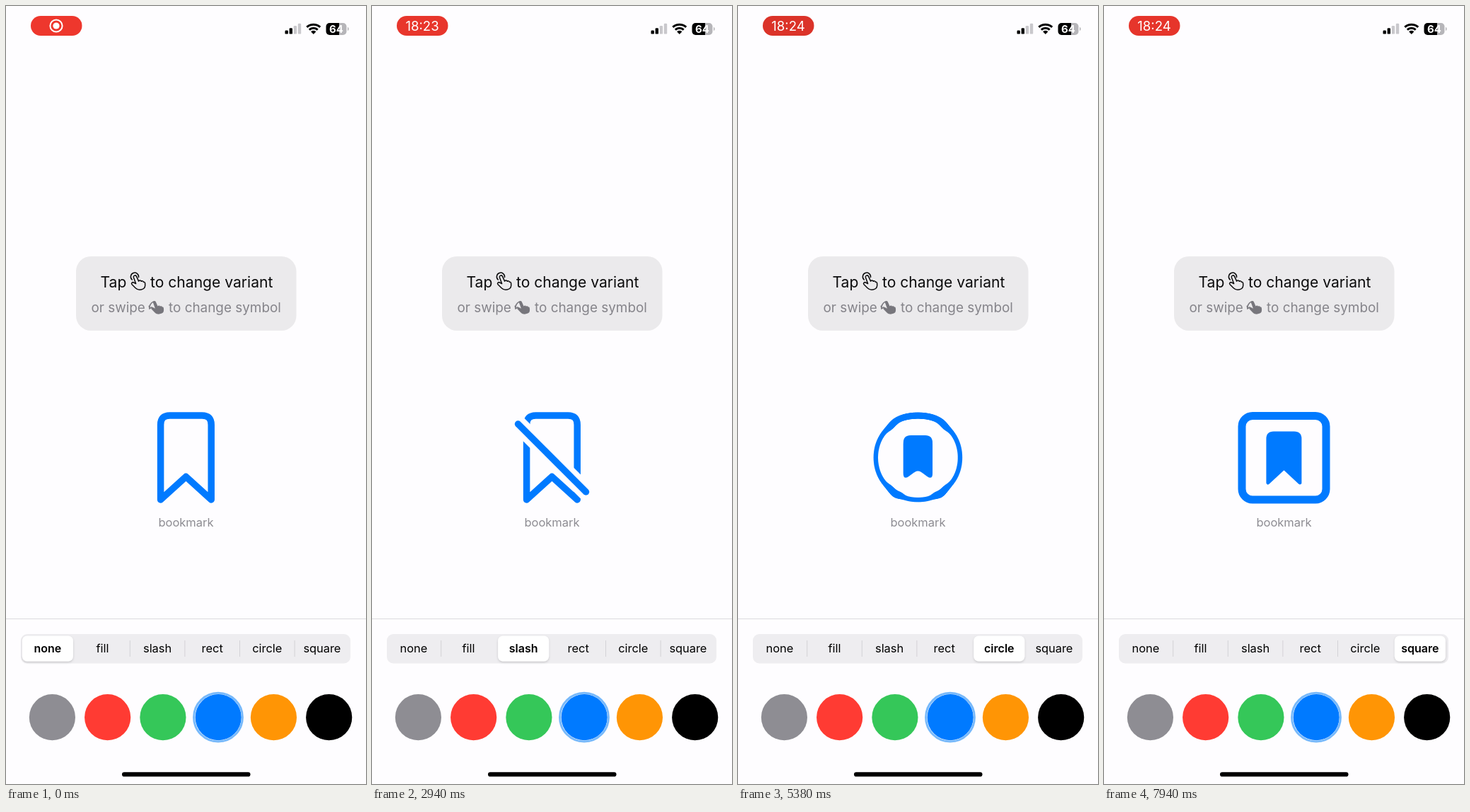
These frames come from a looping animation (509x1100 px, 8000 ms). An HTML page:

```html
<!DOCTYPE html>
<html lang="en">
<head>
<meta charset="utf-8">
<title>Symbol variants</title>
<style>
  html, body { margin: 0; width: 100%; height: 100%; overflow: hidden; background: #fefdff; }
  svg { display: block; width: 100%; height: 100%; font-family: Inter, "Liberation Sans", sans-serif; }
  .mid { text-anchor: middle; }
  .blue { fill: #007aff; stroke: #007aff; stroke-linejoin: round; stroke-linecap: round; }
  .line { fill: none; stroke-width: 9.5; }
  #symbol { isolation: isolate; }
  #symbol > g { mix-blend-mode: plus-lighter; }
</style>
</head>
<body>
<svg viewBox="0 0 509 1100" preserveAspectRatio="none">
  <defs>
    <filter id="goo" filterUnits="userSpaceOnUse" x="150" y="540" width="210" height="200" color-interpolation-filters="sRGB">
      <feGaussianBlur id="blur" stdDeviation="0"/>
      <feColorMatrix values="0 0 0 0 0  0 0 0 0 .478  0 0 0 0 1  0 0 0 14 -6.7"/>
    </filter>
    <filter id="shadow" x="-20%" y="-30%" width="140%" height="170%">
      <feDropShadow dx="0" dy="1.5" stdDeviation="1.8" flood-opacity=".17"/>
    </filter>
    <mask id="gap" maskUnits="userSpaceOnUse" x="150" y="540" width="210" height="200">
      <path d="M150 540h210v200h-210z" fill="#fff"/>
      <path d="M194 578.5L314 698.5" stroke="#000" stroke-width="24"/>
    </mask>
    <path id="hand" d="M180.3 383.5a2.2 2.2 0 0 1 4-1.6l3.3 7.2c1-1.5 3-1.3 3.6.2c1.2-1 2.8-.4 3.2.9c1.2-.3 2.2.4 2.2 2c.6 4 .2 7-3.5 8.2c-4 1.6-7.5.8-10-1.6l-5-5c-1.6-1.8.6-4 2.5-2.8l3 1.6z" stroke-linejoin="round"/>
  </defs>

  <rect width="509" height="1100" fill="#fefdff"/>

  <!-- status bar -->
  <rect id="badge" x="35" y="14" width="72.5" height="28" rx="14"/>
  <g id="record">
    <circle cx="71" cy="28" r="8.6" fill="none" stroke="#fff" stroke-width="2"/>
    <circle cx="71" cy="28" r="4.6" fill="#fff"/>
  </g>
  <text id="clock" class="mid" x="71" y="34.6" font-size="18.6" fill="#fff"></text>
  <g id="bars"></g>
  <g fill="none" stroke="#000" stroke-width="3">
    <path d="M425.3 29.8a14 14 0 0 1 18.9 0"/>
    <path d="M428.8 33.6a8.8 8.8 0 0 1 11.9 0"/>
    <path d="M434.75 40l-3.6-3.7a5.2 5.2 0 0 1 7.2 0z" fill="#000" stroke="none"/>
  </g>
  <path d="M471 24h5.5a5 5 0 0 1 5 5v7a5 5 0 0 1-5 5h-5.5z" fill="#b6b5b9"/>
  <path d="M471 24h-13.5a5 5 0 0 0-5 5v7a5 5 0 0 0 5 5h13.5z"/>
  <path d="M483 29.8a3 3 0 0 1 0 5.4z" fill="#b6b5b9"/>
  <text class="mid" x="467" y="37.9" font-size="15" font-weight="700" fill="#fff">64</text>

  <!-- hint card -->
  <rect x="99" y="354" width="311.5" height="105" rx="21" fill="#ebeaec"/>
  <g font-size="21.1" fill="#0b0b0c">
    <text x="133.5" y="398">Tap</text>
    <text x="204" y="398">to change variant</text>
  </g>
  <g fill="none" stroke="#0b0b0c" stroke-width="1.5">
    <use href="#hand"/>
    <path d="M178.3 387a5.6 5.6 0 1 1 9.2-3.5" stroke-linecap="round"/>
  </g>
  <g font-size="18.9" fill="#85848a">
    <text x="120.5" y="433">or swipe</text>
    <text x="230" y="433">to change symbol</text>
  </g>
  <use href="#hand" transform="translate(42 66.500) scale(.92)" fill="#77767c"/>
  <path d="M203 427.500q-.2-6.500 5.200-9.300M202.300 424.300l.7 3.600 3-2" fill="none" stroke="#77767c" stroke-width="1.500" stroke-linecap="round"/>

  <!-- morphing symbol -->
  <g id="symbol"></g>
  <text class="mid" x="254.500" y="736" font-size="16.500" fill="#8d8c92">bookmark</text>

  <!-- controls -->
  <path d="M0 866.500h509" stroke="#dcdbde"/>
  <rect x="21" y="888" width="466" height="41.500" rx="9" fill="#eeedf0"/>
  <g id="seps" stroke="#d3d2d6"></g>
  <rect id="pill" y="890.500" width="72" height="36" rx="7" fill="#fff" filter="url(#shadow)"/>
  <g id="labels" class="mid" fill="#000"></g>
  <g id="swatches"></g>
  <circle cx="300" cy="1005.700" r="34.400" fill="none" stroke="#78b9fa" stroke-width="3"/>
  <rect x="164" y="1083.300" width="181.500" height="6.200" rx="3.100"/>
</svg>
<script>
const $ = id => document.getElementById(id);
const LOOP = 8000, SLIDE = 350, MORPH = 700;
const clamp = x => Math.min(1, Math.max(0, x));
const smooth = x => x * x * (3 - 2 * x);
const easeOut = x => 1 - (1 - x) ** 3;
const segX = i => 58.9 + i * 77.6;

// Ribbon path around x = 254.4; the stroke rounds its corners
function ribbon(half, top, bottom, notch, r) {
  const l = 254.4 - half, w = 2 * (half - r);
  return `M${l} ${bottom}V${top + r}q0 ${-r} ${r} ${-r}h${w}q${r} 0 ${r} ${r}V${bottom}L254.4 ${notch}z`;
}

const big = ribbon(35.8, 578.9, 698, 665.5, 13);
const shapes = {
  none: `<path class="line" d="${big}"/>`,
  fill: `<path stroke-width="9.5" d="${big}"/>`,
  slash: `<path class="line" d="${big}" mask="url(#gap)"/>
    <path class="line" d="M206.5 591L302.5 687"/>`,
  circle: `<circle class="line" cx="254.4" cy="638.6" r="59.7"/>
    <path stroke-width="5" d="${ribbon(19.7, 608, 668.5, 653.5, 7)}"/>`,
  square: `<rect class="line" style="stroke-width:11" x="195" y="579.5" width="119" height="118.5" rx="15"/>
    <path stroke-width="5" d="${ribbon(22.5, 604, 674, 653, 8)}"/>`
};
$('symbol').innerHTML = Object.entries(shapes)
  .map(([name, body]) => `<g id="s-${name}" class="blue">${body}</g>`).join('');

$('labels').innerHTML = ['none', 'fill', 'slash', 'rect', 'circle', 'square']
  .map((name, i) => `<text x="${segX(i)}" y="914.3">${name}</text>`).join('');
$('seps').innerHTML = [0, 1, 2, 3, 4]
  .map(i => `<path d="M${segX(i + .5)} 897v23"/>`).join('');
$('swatches').innerHTML = ['#8e8d93', '#ff3b33', '#35c759', '#007aff', '#ff9505', '#000']
  .map((color, i) => `<circle cx="${65.4 + i * 78.26}" cy="1005.7" r="32.6" fill="${color}"/>`).join('');
$('bars').innerHTML = [0, 1, 2, 3].map(i =>
  `<rect x="${394.5 + i * 6.1}" y="${34.6 - i * 3.3}" width="4.4" height="${5 + i * 3.3}" rx="1.2" fill="${i < 2 ? '#000' : '#c9c8cc'}"/>`).join('');

// Each tap slides the pill, then morphs the symbol
const taps = [
  { seg: 1, slide: 400, morph: 665, shape: 'fill' },
  { seg: 2, slide: 1820, morph: 2075, shape: 'slash' },
  { seg: 3, slide: 3140, morph: 3400, shape: 'none' },
  { seg: 4, slide: 4640, morph: 4890, shape: 'circle' },
  { seg: 5, slide: 5690, morph: 5860, shape: 'square' }
];

function drawSymbol(t) {
  let from = 'none', to = 'none', p = 1;
  for (const tap of taps) if (t >= tap.morph) {
    from = to;
    to = tap.shape;
    p = clamp((t - tap.morph) / MORPH);
  }
  const mix = smooth(p);
  for (const name in shapes) {
    const alpha = name === to ? mix : name === from ? 1 - mix : 0;
    const g = $('s-' + name);
    g.style.opacity = alpha;
    g.style.display = alpha ? '' : 'none';
  }
  $('blur').setAttribute('stdDeviation', 4.5 * Math.sin(Math.PI * p));
  if (p < 1) $('symbol').setAttribute('filter', 'url(#goo)');
  else $('symbol').removeAttribute('filter');
}

function drawPicker(t) {
  let seg = 0, pos = 0;
  for (const tap of taps) if (t >= tap.slide) {
    pos = seg + (tap.seg - seg) * easeOut(clamp((t - tap.slide) / SLIDE));
    seg = tap.seg;
  }
  const x = segX(pos);
  $('pill').setAttribute('x', x - 36);
  [...$('labels').children].forEach((label, i) => {
    label.setAttribute('font-weight', i === seg ? 600 : 400);
    label.setAttribute('font-size', i === seg ? 16 : 16.4);
  });
  [...$('seps').children].forEach((sep, i) =>
    sep.setAttribute('opacity', clamp(Math.abs(segX(i + .5) - x) - 39.8)));
}

function drawBadge(t) {
  const glow = .93 + .07 * Math.cos((t - 3850) / 3100 * 2 * Math.PI);
  $('badge').setAttribute('fill', `rgb(${[255, 59, 48].map(c => Math.round(c * glow))})`);
  const shown = clamp((t - 450) / 300);
  $('record').setAttribute('opacity', 1 - shown);
  $('clock').setAttribute('opacity', shown);
  $('clock').textContent = t < 3000 ? '18:23' : '18:24';
}

const start = performance.now();
function frame() {
  const t = (performance.now() - start) % LOOP;
  drawSymbol(t);
  drawPicker(t);
  drawBadge(t);
  requestAnimationFrame(frame);
}
frame();
</script>
</body>
</html>
```
